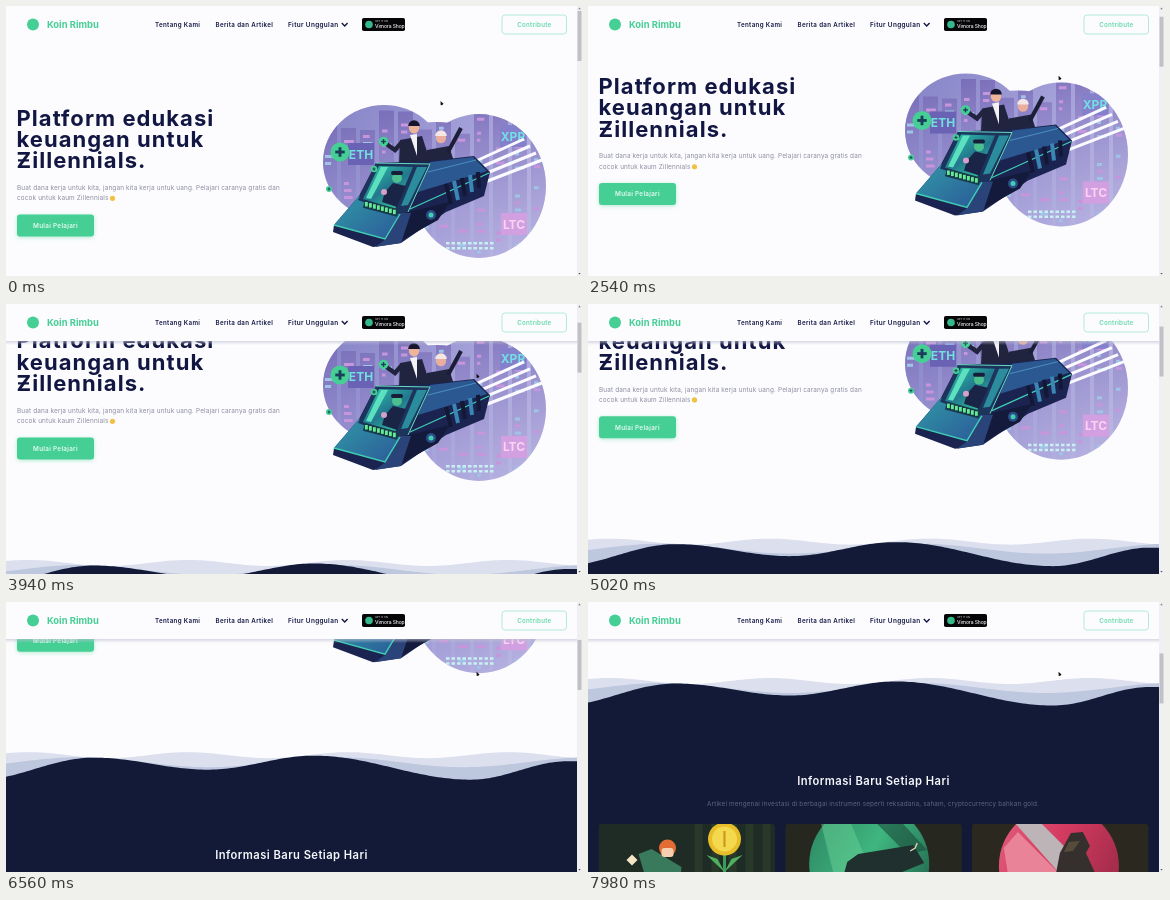
Recreate the animation shown at these times as an HTML page with a canvas. Size 576 by 270 pixels, loop 8000 ms.

```html
<!DOCTYPE html>
<html lang="id">
<head>
<meta charset="utf-8">
<title>Koin Rimbu</title>
<style>
  html, body { margin: 0; width: 100%; height: 100%; overflow: hidden; background: #fcfcfe; }
  canvas { display: block; width: 576px; height: 270px; }
</style>
</head>
<body>
<canvas id="stage"></canvas>
<script>
const W = 576, H = 270, LOOP = 8000, PAGE_W = 571, HEADER_H = 37;
const PAPER = '#fcfcfe', INK = '#121642', NAVY = '#121a38', GREEN = '#45cf95', TEAL = '#3fd0b4';
const SANS = 'Inter, "Open Sans", sans-serif';

const canvas = document.getElementById('stage');
const g = canvas.getContext('2d');
const ratio = window.devicePixelRatio || 1;
canvas.width = W * ratio;
canvas.height = H * ratio;

// Key points as [position, value]
const SCROLL = [[1400, 0], [2540, 31.5], [3940, 75], [5020, 96.3], [5760, 150], [7020, 198.5], [7980, 255]];
const RIDGE = [[-30, 359], [88, 336.5], [202, 348.5], [308, 334.5], [465, 358.5], [562, 340]];

const clamp = v => Math.max(0, Math.min(1, v));
const ease = v => (1 - Math.cos(Math.PI * v)) / 2;
const linear = v => v;

function at(keys, p, curve = linear) {
  return keys.slice(1).reduce((value, [p1, v1], i) => {
    const [p0, v0] = keys[i];
    return value + (v1 - v0) * curve(clamp((p - p0) / (p1 - p0)));
  }, keys[0][1]);
}

function seeded(seed) {
  return () => (seed = (seed * 16807) % 2147483647) / 2147483647;
}

function rect(x, y, w, h, fill, r = 0) {
  g.beginPath();
  g.roundRect(x, y, w, h, r);
  g.fillStyle = fill;
  g.fill();
}

function disc(x, y, r, fill) {
  g.beginPath();
  g.arc(x, y, r, 0, 7);
  g.fillStyle = fill;
  g.fill();
}

function trace(p) {
  g.beginPath();
  for (let i = 0; i < p.length; i += 2) g.lineTo(p[i], p[i + 1]);
}

function poly(fill, ...p) {
  trace(p);
  g.fillStyle = fill;
  g.fill();
}

function line(color, width, ...p) {
  trace(p);
  g.strokeStyle = color;
  g.lineWidth = width;
  g.stroke();
}

function text(s, x, y, size, color, { weight = 400, align = 'left', gap = 0 } = {}) {
  g.font = `${weight} ${size}px ${SANS}`;
  g.letterSpacing = gap + 'px';
  g.textAlign = align;
  g.fillStyle = color;
  g.fillText(s, x, y);
}

function ramp(x0, y0, x1, y1, ...colors) {
  const f = g.createLinearGradient(x0, y0, x1, y1);
  colors.forEach((c, i) => f.addColorStop(i / (colors.length - 1), c));
  return f;
}

function plusCoin(x, y, r) {
  disc(x, y, r, GREEN);
  rect(x - r * 0.5, y - r * 0.15, r, r * 0.3, '#1b3f5a');
  rect(x - r * 0.15, y - r * 0.5, r * 0.3, r, '#1b3f5a');
}

function sign(s, x, y, fill, color) {
  rect(x, y, 26, 22, fill);
  text(s, x + 13, y + 15.5, 12, color, { weight: 700, align: 'center' });
}

function city() {
  const random = seeded(23);
  g.save();
  g.beginPath();
  g.ellipse(378, 156, 61, 57, 0, 0, 7);
  g.ellipse(430, 165, 72, 49, 0, 0, 7);
  g.ellipse(473, 180, 67, 72, 0, 0, 7);
  g.clip();
  rect(310, 90, 235, 170, ramp(317, 100, 540, 250, '#8583c6', '#a39fd8', '#bdbbe4'));
  for (let x = 316; x < 540; x += 19) {
    const top = 95 + random() * 45;
    rect(x, top, 15, 170, ramp(0, 95, 0, 250, 'rgba(92,72,160,.5)', 'rgba(165,150,215,.15)'));
    for (let y = top + 5; y < 250; y += 7) {
      if (random() < 0.45) rect(x + 3, y, 3 + random() * 7, 3, random() < 0.5 ? '#9fc4e6' : '#c795dc');
    }
  }
  sign('ETH', 342, 137, '#6a62b4', '#72e0dc');
  sign('XPR', 494, 119, '#8480cc', '#72dfe2');
  sign('LTC', 495, 207, '#d2a0e0', '#f8d4f4');
  for (let i = 0; i < 18; i++) rect(440 + (i % 9) * 5.5, 236 + Math.floor(i / 9) * 5, 3.5, 2.5, '#c8f0f2');
  g.restore();
}

function rider(x, y, skin, hair) {
  poly('#20243f', x - 14, y + 12, x + 8, y + 8, x + 17, y + 36, x - 15, y + 36);
  disc(x, y, 5.2, skin);
  g.beginPath();
  g.arc(x, y - 2, 5.8, Math.PI, 0);
  g.fillStyle = hair;
  g.fill();
}

function ship() {
  for (let i = 0; i < 4; i++) line('#fafaff', 3, 470 + i * 3, 155 + i * 7, 518 + i * 6, 133 + i * 7);

  rider(435, 132, '#e9ae9e', '#f3e6e4');
  line('#1c1e38', 4, 442, 146, 455, 122);
  rider(408, 122, '#eeb49a', '#15162c');
  line('#20243f', 4.5, 396, 136, 389, 144, 379, 137);
  poly('#f4f1f4', 404, 129, 411, 128, 411, 150);

  // Hull
  poly('#1b2450', 370, 157, 424, 155, 468, 150, 484, 166, 478, 190, 440, 206, 395, 237, 367, 241, 327, 226, 328, 219, 353, 190);
  poly('#2b5890', 424, 156, 467, 151, 481, 165, 412, 186);
  poly('#141a3c', 402, 206, 444, 196, 432, 214, 396, 234);
  line(TEAL, 1.2, 404, 203, 446, 184, 483, 167);
  line('#4b8fc0', 1, 422, 166, 470, 154);
  for (let i = 0; i < 5; i++) line(i % 2 ? '#3a86b4' : '#121836', 4, 440 + i * 8, 178 - i * 3, 445 + i * 7, 198 - i * 4);
  disc(425, 209, 5, '#2d4c86');
  disc(425, 209, 2.5, TEAL);

  // Hood
  poly(ramp(340, 195, 375, 240, '#2f8fa4', '#2c5f9a'), 353, 190, 394, 207, 380, 233, 328, 219);
  poly('#2a4479', 394, 207, 405, 207, 395, 237, 369, 241, 380, 233);
  line(TEAL, 1.4, 328, 219, 379, 233, 394, 208);

  // Canopy
  poly('#1d355c', 370, 157, 424, 158, 402, 206, 391, 208, 352, 194);
  poly(ramp(365, 160, 395, 205, '#2cbfa6', '#23778e', '#35cf9c'), 373, 160, 407, 161, 389, 203, 357, 193);
  poly('#2a8c9c', 411, 161, 421, 161, 402, 199, 395, 200);
  poly('#5ce0c0', 375, 161, 382, 161, 365, 193, 360, 192);
  poly('#1a2446', 379, 186, 387, 177, 400, 180, 391, 201, 376, 196);
  disc(391, 172, 5, '#4bc08e');
  rect(385, 165, 12, 4, '#181e3a', 2);
  disc(378, 186, 3, '#d79fc9');
  line('#173a4c', 8, 358, 198, 392, 207);
  for (let i = 0; i < 8; i++) rect(359 + i * 4, 196 + i * 1.1, 2.8, 4.5, '#66ea92');
  line('#66dcc0', 1, 370, 157, 424, 158, 402, 206);
}

function hero() {
  ['Platform edukasi', 'keuangan untuk', 'Zillennials.'].forEach((s, i) =>
    text(s, 10.5, 119.5 + i * 21.4, 22, INK, { weight: 700, gap: 1.05 }));
  rect(12, 153.3, 11, 2.2, INK);
  ['Buat dana kerja untuk kita, jangan kita kerja untuk uang. Pelajari caranya gratis dan', 'cocok untuk kaum Zillennials'].forEach((s, i) =>
    text(s, 11, 184 + i * 10.3, 6.4, '#8b8ca0', { gap: 0.15 }));
  disc(106.5, 192.3, 2.6, '#f2c044');

  g.save();
  g.shadowColor = 'rgba(69,207,149,.4)';
  g.shadowBlur = 4 * ratio;
  g.shadowOffsetY = ratio;
  rect(11, 208.5, 77, 22, GREEN, 3);
  g.restore();
  text('Mulai Pelajari', 49.5, 222, 6.3, '#e6faf2', { weight: 600, align: 'center', gap: 0.3 });

  city();
  ship();
  plusCoin(334, 146, 9.5);
  plusCoin(377.5, 135.5, 4.8);
  plusCoin(368, 163, 3.3);
  plusCoin(323, 183, 3);
}

function wave(fill, height) {
  g.beginPath();
  g.moveTo(0, 700);
  for (let x = 0; x < PAGE_W + 3; x += 3) g.lineTo(Math.min(x, PAGE_W), height(x));
  g.lineTo(PAGE_W, 700);
  g.fillStyle = fill;
  g.fill();
}

function waves() {
  const swell = (mid, size, crest, length) => x => mid - size * Math.cos((x - crest) / length * 2 * Math.PI);
  wave('#dcdfee', swell(334, 3, 342, 160));
  wave('#bdc7dd', swell(341, 5, 330, 255));
  wave(NAVY, x => at(RIDGE, x, ease));
}

function card(i, fill, draw) {
  g.save();
  g.translate(10.5 + i * 186.7, 477);
  g.beginPath();
  g.roundRect(0, 0, 176.5, 110, 3);
  g.clip();
  rect(0, 0, 177, 110, fill);
  draw();
  g.restore();
}

function garden() {
  for (let x = 96; x < 177; x += 17) rect(x, 0, 8, 110, 'rgba(70,95,50,.28)');
  line('#3c9a5a', 3, 126, 28, 126, 70);
  for (const side of [-1, 1]) poly('#4fb062', 126, 48, 126 + side * 18, 31, 126 + side * 7, 35);
  disc(126, 15, 16.5, '#e8bd2a');
  disc(126, 15, 12.5, '#f4d84e');
  line('#c89a22', 2.2, 126, 7, 126, 23);
  poly('#3a7a5c', 40, 30, 53, 25, 83, 43, 80, 70, 52, 70);
  disc(69, 24, 8.5, '#e36c35');
  rect(63, 24, 12, 9, '#f6cfb0', 3);
  poly('#f3e6c4', 33.5, 30.5, 39, 36, 33.5, 41.5, 28, 36);
}

function bull() {
  disc(84, 40, 60, ramp(30, 0, 140, 60, '#2f8b66', '#3fb67f', '#257154'));
  poly('rgba(104,210,150,.5)', 36, 0, 66, 0, 86, 48, 48, 48);
  poly('rgba(28,76,60,.6)', 92, 0, 118, 0, 142, 26, 122, 30);
  poly('#20302e', 56, 60, 62, 38, 73, 30, 128, 21, 139, 39, 117, 48, 114, 60, 104, 48, 84, 48, 72, 60);
  line('#e2dcb4', 1.3, 125, 27, 130, 24, 132, 19);
}

function bear() {
  disc(87, 42, 60, ramp(30, 0, 140, 50, '#e05a78', '#d43a60', '#a62d4c'));
  poly('#e98498', 32, 24, 46, 8, 88, 50, 36, 50);
  poly('#bdb4b8', 44, 0, 70, 0, 110, 40, 88, 50);
  poly('#35302e', 84, 50, 88, 29, 99, 9, 111, 8, 118, 22, 114, 29, 126, 55);
  poly('#574b3c', 97, 18, 108, 17, 101, 27, 92, 28);
}

function articles() {
  text('Informasi Baru Setiap Hari', 285.5, 437.8, 11.2, '#f6f8fc', { weight: 600, align: 'center', gap: 0.45 });
  text('Artikel mengenai investasi di berbagai instrumen seperti reksadana, saham, cryptocurrency bahkan gold.',
    285, 459.2, 6.4, '#5d647c', { align: 'center', gap: 0.15 });
  card(0, '#1f2b25', garden);
  card(1, '#26281f', bull);
  card(2, '#2b2820', bear);
}

function header(scroll) {
  if (scroll > 40) {
    rect(0, HEADER_H, PAGE_W, 4, ramp(0, HEADER_H, 0, HEADER_H + 4, 'rgba(190,192,210,.6)', 'rgba(190,192,210,0)'));
    rect(0, 0, PAGE_W, HEADER_H, PAPER);
  }
  disc(27, 18.5, 6, GREEN);
  text('Koin Rimbu', 41, 22, 9.4, GREEN, { weight: 700 });

  const nav = { weight: 600, gap: 0.35 };
  text('Tentang Kami', 149, 20.5, 6.2, INK, nav);
  text('Berita dan Artikel', 209.5, 20.5, 6.2, INK, nav);
  text('Fitur Unggulan', 282, 20.5, 6.4, INK, nav);
  line(INK, 1.4, 335.8, 17, 338.7, 20, 341.6, 17);

  rect(356, 12, 43, 13, '#060608', 1.8);
  disc(363, 18.5, 3.8, '#35b98a');
  text('GET IT ON', 369, 16.4, 2.6, '#dcdce0');
  text('Vimora Shop', 369, 22, 5, '#f4f4f8', { weight: 500, gap: -0.1 });

  g.beginPath();
  g.roundRect(496, 9, 64.5, 19, 3);
  g.strokeStyle = '#b4ead8';
  g.lineWidth = 1;
  g.stroke();
  text('Contribute', 528.3, 20.8, 6.2, '#66d8ab', { weight: 600, align: 'center', gap: 0.25 });
}

function scrollbar(scroll) {
  rect(PAGE_W, 0, 5, H, '#f0f0f3');
  rect(PAGE_W + 0.5, 5 + scroll * 0.182, 4, 50, '#c0c0c6');
  poly('#74747a', 572.3, 3.2, 573.5, 1.6, 574.7, 3.2);
  poly('#505056', 572.3, 267, 573.5, 268.6, 574.7, 267);
}

function pointer(t) {
  const k = ease(clamp(t / 1400));
  const x = 434.5 + 36 * k, y = 95 - 25.3 * k;
  poly('#101010', x, y, x + 0.2, y + 4.2, x + 1.8, y + 4, x + 3, y + 2.7);
}

function draw(t) {
  const scroll = at(SCROLL, t);
  g.setTransform(ratio, 0, 0, ratio, 0, 0);
  rect(0, 0, W, H, PAPER);
  g.save();
  g.translate(0, -scroll);
  hero();
  waves();
  articles();
  g.restore();
  header(scroll);
  scrollbar(scroll);
  pointer(t);
}

function tick() {
  draw(performance.now() % LOOP);
  requestAnimationFrame(tick);
}
tick();
</script>
</body>
</html>
```
